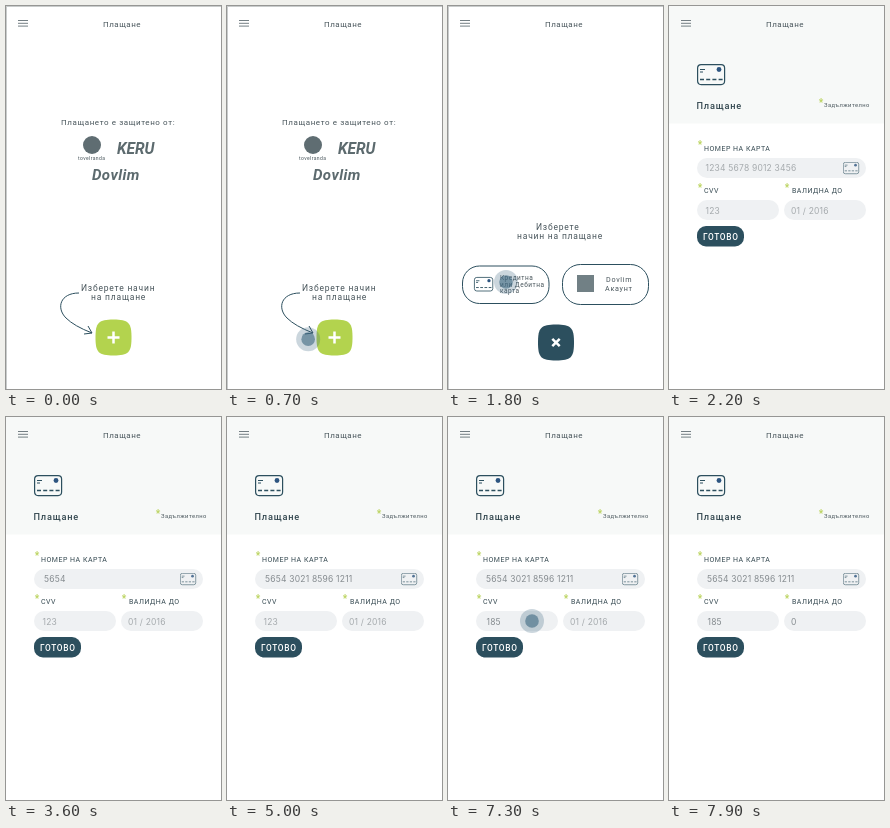
Recreate the animation shown at these times as an HTML page. Size 215 px wide and 383 px high, loop 8 s.

```html
<!DOCTYPE html>
<html lang="bg">
<head>
<meta charset="utf-8">
<title>Плащане</title>
<style>
html, body { margin: 0; width: 100%; height: 100%; overflow: hidden; background: #fff; }
svg { display: block; width: 100vw; height: 100vh; }
text { font: 8px Roboto, sans-serif; fill: #48555b; }
.lead text { font-size: 8.5px; letter-spacing: .8px; }
.small text { font-size: 6.5px; letter-spacing: .5px; }
.option text { font-size: 7.2px; letter-spacing: .7px; }
.label text { font-size: 7px; letter-spacing: .5px; fill: #344850; }
.brand text { font-weight: 700; font-style: italic; fill: #5c6a6e; }
.input text { font: 8.5px Inter, sans-serif; letter-spacing: .2px; }
.star text { font-size: 10px; font-weight: 700; fill: #b9d25a; text-anchor: middle; }
.line { fill: none; stroke: #2c4f5e; }
</style>
</head>
<body>
<svg viewBox="0 0 215 383">
  <defs>
    <path id="blob" d="M-18 0C-18-15-15-18 0-18S18-15 18 0 15 18 0 18-18 15-18 0Z"/>
    <g id="card">
      <rect class="line" x=".6" y=".6" width="27" height="20" rx="3.5" stroke-width="1.2"/>
      <path class="line" d="M3 5.5h5M3 8h3" stroke-width="1.2"/>
      <path class="line" d="M3 15.5h23" stroke-width="1.3" stroke-dasharray="4 2.2"/>
      <circle cx="22" cy="5.5" r="2.4" fill="#2d5580"/>
    </g>
  </defs>

  <g id="intro">
    <path d="M0 .5H215M.5 0V383" stroke="#c9cccc"/>
    <text x="55" y="119" letter-spacing=".6">Плащането е защитено от:</text>
    <circle cx="86" cy="139" r="9" fill="#5f6d72"/>
    <g class="brand">
      <text x="111" y="148" style="font-size:15.5px">KERU</text>
      <text x="86" y="174" style="font-size:15px" letter-spacing=".4">Dovlim</text>
    </g>
    <text x="72" y="154" style="font-size:5px" letter-spacing=".4">tovelranda</text>
    <g class="lead">
      <text x="75" y="285">Изберете начин</text>
      <text x="85" y="294">на плащане</text>
    </g>
    <path class="line" d="M73 287C54 287 50 302 60 312Q68 320 86 327M78 328L86 327 82 320"/>
    <use href="#blob" x="107.5" y="331.5" fill="#b3d34e"/>
    <path d="M101.5 331.5h12m-6-6v12" stroke="#fff" stroke-width="2.5"/>
  </g>

  <g id="choice">
    <rect x="1" y="1" width="214" height="382" fill="#fff"/>
    <g class="lead">
      <text x="88" y="224">Изберете</text>
      <text x="69" y="233">начин на плащане</text>
    </g>
    <rect class="line" x="14.5" y="260" width="86.5" height="37.5" rx="17"/>
    <rect class="line" x="114.5" y="258.5" width="86" height="40" rx="18"/>
    <use href="#card" transform="translate(26 271)scale(.68)"/>
    <g class="small">
      <text x="52" y="274">Кредитна</text>
      <text x="52" y="280.5">или Дебитна</text>
      <text x="52" y="287">карта</text>
    </g>
    <rect x="129" y="269" width="17" height="17" fill="#718085"/>
    <g class="option">
      <text x="158" y="275.5">Dovlim</text>
      <text x="157" y="284.5">Акаунт</text>
    </g>
    <use href="#blob" x="108" y="336.5" fill="#2c4f5e"/>
    <path d="M104.3 332.8l7.4 7.4m0-7.4l-7.4 7.4" stroke="#fff" stroke-width="2.5"/>
  </g>

  <g id="form">
    <rect width="215" height="383" fill="#fff"/>
    <rect width="215" height="117.5" fill="#f7f9f8"/>
    <use href="#card" x="28" y="58"/>
    <text x="27.5" y="102.5" style="font-size:9.2px;font-weight:500;fill:#344850" letter-spacing=".8">Плащане</text>
    <text x="155" y="101" style="font-size:5.8px" letter-spacing=".45">Задължително</text>
    <g class="star">
      <text x="152" y="100">*</text>
      <text x="31" y="142">*</text>
      <text x="31" y="185">*</text>
      <text x="118" y="185">*</text>
    </g>
    <g class="label">
      <text x="35" y="144.5">НОМЕР НА КАРТА</text>
      <text x="35" y="187">CVV</text>
      <text x="123" y="187">ВАЛИДНА ДО</text>
    </g>
    <g fill="#eff1f3">
      <rect x="28" y="152" width="169" height="20" rx="10"/>
      <rect x="28" y="194" width="82" height="20" rx="10"/>
      <rect x="115" y="194" width="82" height="20" rx="10"/>
    </g>
    <use href="#card" transform="translate(174 156)scale(.57)" opacity=".8"/>
    <g class="input">
      <text id="number" y="165"></text>
      <text id="cvv" y="207.5"></text>
      <text id="date" y="207.5"></text>
    </g>
    <rect x="28" y="220" width="47" height="20.5" rx="9" fill="#2c4f5e"/>
    <text x="34" y="233.5" style="font-size:8.3px;font-weight:500;fill:#fff" letter-spacing=".7">ГОТОВО</text>
  </g>

  <path d="M12 14.5H22M12 17.3H22M12 20.1H22" stroke="#657176" stroke-width=".9"/>
  <text x="97" y="21" letter-spacing=".5">Плащане</text>

  <g id="touch" fill="#3d6880">
    <circle r="12" opacity=".27"/>
    <circle r="6.8" opacity=".6"/>
  </g>
</svg>
<script>
const LOOP = 8000, STEP = 100;
const $ = id => document.getElementById(id);
const clamp = v => Math.max(0, Math.min(1, v));
const ease = p => p * p * (3 - 2 * p);

// start, arrive, release, from x, y, to x, y
const taps = [
  [500, 800, 1000, 6, 335, 107.5, 332.5],
  [1600, 1800, 2000, 64, 336, 58, 276],
  [2700, 3000, 3200, 6, 149.5, 82, 161.5],
  [5800, 6000, 6200, 82, 161.5, 66.5, 204],
  [7300, 7500, 7700, 84, 204, 154, 204],
];

// keys holds the time at which each digit is typed
const fields = [
  { id: 'number', hint: '1234 5678 9012 3456', value: '5654302185961211', x: 36.5, shift: 1.5, clear: 3300,
    keys: [3400, 3500, 3600, 3600, 3800, 3900, 4000, 4100, 4300, 4400, 4500, 4600, 4700, 4900, 4900, 5000] },
  { id: 'cvv', hint: '123', value: '185', x: 36.5, shift: 2, clear: 6300, keys: [6500, 6600, 6700] },
  { id: 'date', hint: '01 / 2016', value: '0', x: 122, shift: 0, clear: 7800, keys: [7900] },
];

function drawField({ id, hint, value, x, shift, clear, keys }, t) {
  const typing = t >= clear, node = $(id);
  const digits = value.slice(0, keys.filter(k => k <= t).length);
  node.textContent = typing ? digits.replace(/(\d{4})(?=\d)/g, '$1 ') : hint;
  node.setAttribute('x', x + (typing ? shift : 0));
  node.style.fill = typing ? '#858b8f' : '#a5aaad';
}

function drawTouch(t) {
  const tap = taps.find(([start, , release]) => t >= start && t <= release);
  $('touch').style.opacity = tap ? (t < tap[2] ? 1 : .5) : 0;
  if (!tap) return;
  const [start, arrive, , x0, y0, x1, y1] = tap;
  const p = ease(clamp((t - start) / (arrive - start)));
  $('touch').setAttribute('transform', `translate(${x0 + (x1 - x0) * p} ${y0 + (y1 - y0) * p})`);
}

function draw(now) {
  const t = Math.floor(now % LOOP / STEP) * STEP;
  $('choice').style.opacity = clamp((t - 900) / 200);
  $('form').style.opacity = clamp((t - 1900) / 300);
  fields.forEach(f => drawField(f, t));
  drawTouch(t);
  requestAnimationFrame(draw);
}
draw(performance.now());
</script>
</body>
</html>
```
